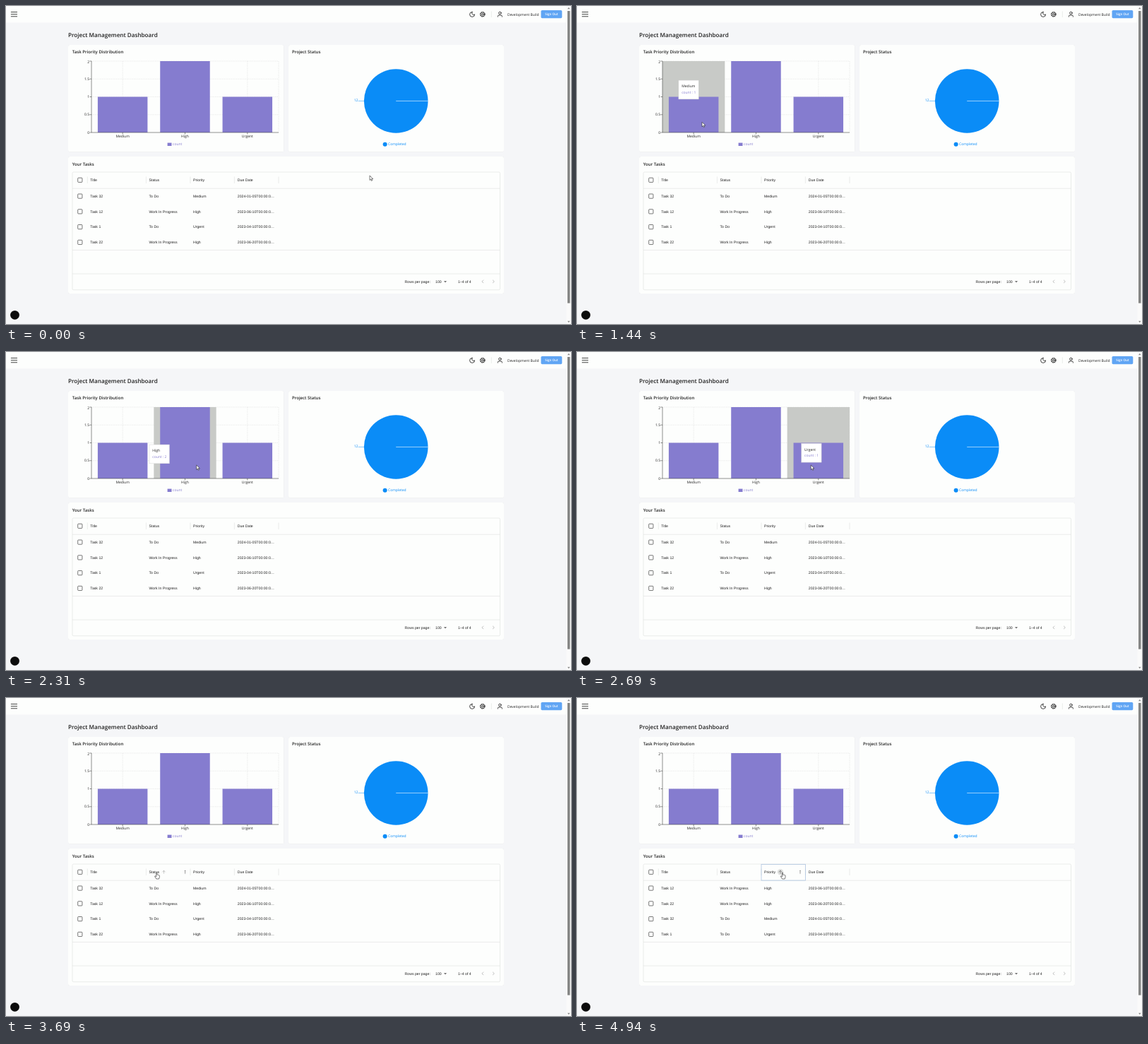
Animation of 800 by 450 pixels, one loop 5000 ms. Source, as an HTML page:

```html
<!DOCTYPE html>
<html lang="en">
<head>
<meta charset="utf-8">
<title>Dashboard</title>
<style>
  html, body { margin: 0; width: 100%; height: 100%; overflow: hidden; background: #f5f6f8; }
  svg { display: block; width: 100vw; height: 100vh; }
  text { font: 5px "Open Sans", sans-serif; fill: #222; text-rendering: geometricPrecision; white-space: pre; }
  .h1 { font-size: 8.15px; font-weight: 600; }
  .h2 { font-size: 6.05px; font-weight: 600; }
  .cell { font: 5.2px "Liberation Sans", Arial, sans-serif; }
  .mid { text-anchor: middle; }
  .end { text-anchor: end; }
  .count { fill: #857ccf; }
  .done { fill: #0a8cf7; }
  .card { fill: #fdfefd; filter: drop-shadow(0 .6px .7px rgba(0,0,0,.13)); }
  .line { fill: none; stroke: #dedfde; stroke-width: .6; }
  .grid { fill: none; stroke: #ccc; stroke-width: .42; stroke-dasharray: 1.25; }
  .axis { fill: none; stroke: #444; stroke-width: .6; }
  .box { fill: none; stroke: #555; stroke-width: .8; }
  .icon { fill: none; stroke: #222; stroke-width: .85; stroke-linecap: round; stroke-linejoin: round; }
</style>
</head>
<body>
<svg viewBox="0 0 800 450" preserveAspectRatio="none">
  <rect width="800" height="450" fill="#f5f6f8"/>
  <rect width="794" height="23.5" fill="#fdfefd"/>

  <path class="icon" stroke-width="1" d="M7.3 8.6H15.6M7.3 11.7H15.6M7.3 14.8H15.6"/>
  <path class="icon" d="M660.1 8.4a2.5 2.5 0 0 0 3.5 3.5a3.5 3.5 0 1 1-3.5-3.5z"/>
  <g class="icon">
    <circle cx="674.8" cy="11.8" r="1.3"/>
    <circle cx="674.8" cy="11.8" r="3"/>
    <circle cx="674.8" cy="11.8" r="3.5" stroke-dasharray="1.37" stroke-linecap="butt"/>
  </g>
  <path class="line" d="M687.3 7.5V16"/>
  <g class="icon"><circle cx="699.4" cy="9.9" r="1.7"/><path d="M696.4 15.2v-.7a1.5 1.5 0 0 1 1.5-1.5h3a1.5 1.5 0 0 1 1.5 1.5v.7"/></g>
  <text x="710" y="13.6" font-size="4.9">Development Build</text>
  <rect x="757.5" y="6" width="29.8" height="11.2" rx="1.6" fill="#60a5f4"/>
  <text class="mid" x="772.4" y="13.3" style="font-size:4.5px;font-weight:600;fill:#fff">Sign Out</text>

  <text class="h1" x="88" y="44.4">Project Management Dashboard</text>
  <rect class="card" x="88" y="55" width="305.5" height="151.5" rx="2.5"/>
  <rect class="card" x="400" y="55" width="305" height="151.5" rx="2.5"/>
  <rect class="card" x="88" y="213" width="617" height="194" rx="2.5"/>
  <text class="h2" x="93.8" y="67.2">Task Priority Distribution</text>
  <text class="h2" x="405" y="67.2">Project Status</text>
  <text class="h2" x="93.8" y="226.2">Your Tasks</text>

  <g id="chart"></g>

  <circle class="done" cx="552.2" cy="134.5" r="45.3"/>
  <path d="M552.2 134.4H597.5" stroke="#fff" stroke-width=".6"/>
  <path d="M498.7 134.4H507" stroke="#0a8cf7" stroke-width=".5"/>
  <text class="done end" x="498.4" y="134.5">12</text>
  <circle class="done" cx="536.6" cy="195.7" r="3"/>
  <text class="done" x="541" y="197.2">Completed</text>

  <rect class="line" x="94" y="235" width="605.5" height="166.7" rx="1.6"/>
  <path class="line" d="M94 258.2H699.5M94 345.4H699.5M94 379H699.5"/>
  <path class="line" d="M115.3 241.5V251M198.4 241.5V251M261 241.5V251M323.4 241.5V251M386 241.5V251"/>
  <g id="head"></g>
  <g id="rows"></g>

  <text class="cell" x="564.5" y="391.6">Rows per page:</text>
  <text class="cell" x="608" y="391.6">100</text>
  <path d="M620 389.2h4l-2 2z" fill="#555"/>
  <text class="cell" x="640" y="391.6">1–4 of 4</text>
  <path class="icon" style="stroke:#b5b6b5" d="M675.8 388l-1.9 1.9l1.9 1.9M689.4 388l1.9 1.9l-1.9 1.9"/>

  <circle cx="12.5" cy="437.3" r="6.4" fill="#0c0c0c"/>
  <rect x="793.5" width="6.5" height="450" fill="#fafafa"/>
  <rect x="795" y="7" width="3.6" height="413.5" fill="#858685"/>
  <path d="M795 4.2h3.6l-1.8-2.2zM795 445.8h3.6l-1.8 2.2z" fill="#858685"/>

  <g id="tip">
    <rect width="28.4" height="26.8" fill="#fff" stroke="#ccc" stroke-width=".4"/>
    <text id="tipName" x="4.3" y="10.3"></text>
    <text id="tipCount" class="count" x="4.3" y="18.8"></text>
  </g>
  <g id="cursor" stroke-width=".6" stroke-linejoin="round">
    <path id="arrow" fill="#fff" stroke="#222" d="M0 0v6.5l1.5-1.4l1 2.3l1.1-.5l-1-2.2h2.1z"/>
    <path id="hand" fill="#fff" stroke="#222" d="M-.6 .5q.6-.8 1.2 0v3q.7-.6 1.2.1q.7-.4 1.1.2q1-.2 1.1.8v2.2l-.8 2.4h-3.6l-2.3-3.4q0-1 .9-.6l1.2 1z"/>
  </g>
</svg>
<script>
const $ = id => document.getElementById(id);
const LOOP = 5000, STEP = 62.5;

const bars = [['Medium', 1], ['High', 2], ['Urgent', 1]];
const bandW = 88.33, bandX = i => 121 + i * bandW, bandMid = i => bandX(i) + bandW / 2;

const cols = [
  { name: 'Title', x: 119.3, left: 115.3, right: 198.4, icon: 135 },
  { name: 'Status', x: 202.5, left: 198.4, right: 261, icon: 223.5 },
  { name: 'Priority', x: 265, left: 261, right: 323.4, icon: 288 },
  { name: 'Due Date', x: 327.8, left: 323.4, right: 386, icon: 356 }
];
const tasks = [
  ['Task 32', 'To Do', 'Medium', '2024-01-05'],
  ['Task 12', 'Work In Progress', 'High', '2023-06-10'],
  ['Task 1', 'To Do', 'Urgent', '2023-04-10'],
  ['Task 22', 'Work In Progress', 'High', '2023-06-20']
];

// time, x, y of the pointer tip
const path = [
  [0, 515, 240], [690, 515, 240], [812, 438.5, 259.5], [940, 340, 252], [1060, 270, 243],
  [1187, 228, 239], [1250, 203, 205], [1312, 184, 172], [1437, 177, 164.3], [2125, 180, 163],
  [2234, 212, 161], [2312, 269.7, 160], [2440, 272, 160], [2526, 299, 160], [2688, 331.3, 160],
  [2940, 335, 160], [3060, 310, 182], [3250, 235, 232], [3440, 190, 257], [3500, 190, 257],
  [3687, 213.3, 246.8], [4250, 213.3, 246.8], [4500, 291, 246.8], [5000, 291, 246.8]
];
// start of each chart hover, with the tooltip's starting corner
const hovers = [
  { t: 1282, x: 94, y: 49 },
  { t: 2234, x: 169.3, y: 132 },
  { t: 2526, x: 257.7, y: 129 }
];
const hoverEnd = 3050;
const sorts = [{ t: 4060, col: 1 }, { t: 4690, col: 2 }];

const text = (s, x, y, cls = '') => `<text class="${cls}" x="${x}" y="${y}">${s}</text>`;
const checkbox = y => `<rect class="box" x="101.7" y="${y - 3}" width="6.2" height="6.2" rx=".8"/>`;

function buildChart() {
  let s = '<rect id="band" y="78" height="101" fill="#c8cac7"/>', ticks = 'M121 78V179H386';
  for (let i = 0; i < 5; i++) {
    const y = 179 - i * 25.25;
    ticks += `M118.5 ${y}H121`;
    if (i) s += `<path class="grid" d="M121 ${y}H386"/>`;
    s += text(i / 2, 118, y + (i === 4 ? 3 : 1.7), 'end');
  }
  bars.forEach(([name, n], i) => {
    const mid = bandMid(i), h = n * 50.5;
    s += `<path class="grid" d="M${mid} 78V179"/>` + text(name, mid, 185.8, 'mid');
    s += `<rect class="count" x="${bandX(i) + 8.9}" y="${179 - h}" width="70.5" height="${h}"/>`;
    ticks += `M${mid} 179v2.5`;
  });
  s += `<path class="grid" d="M386 78V179"/><path class="axis" d="${ticks}"/>`;
  s += '<rect class="count" x="228.6" y="193.6" width="5.9" height="4.4"/>' + text('count', 236, 197.2, 'count');
  // the hover band lies over the grid but under the bars
  $('chart').innerHTML = s;
  const band = $('band');
  $('chart').querySelectorAll('.grid').forEach(g => $('chart').prepend(g));
  $('chart').insertBefore(band, $('chart').querySelector('rect.count'));
}

function pointerAt(t) {
  const i = Math.max(1, path.findIndex(p => p[0] > t));
  const [t0, x0, y0] = path[i - 1], [t1, x1, y1] = path[i];
  const k = (t - t0) / (t1 - t0);
  return [x0 + (x1 - x0) * k, y0 + (y1 - y0) * k];
}

function drawTip(t, py) {
  const i = t < hoverEnd ? hovers.filter(h => h.t <= t).length - 1 : -1;
  const shown = i < 0 ? 'none' : '';
  $('tip').style.display = $('band').style.display = shown;
  if (i < 0) return;
  const h = hovers[i], [name, n] = bars[i];
  const k = 1 - (1 - Math.min(1, (t - h.t) / 400)) ** 2.2;
  const x = h.x + (bandMid(i) + 4.2 - h.x) * k, y = h.y + (py - 30.5 - h.y) * k;
  $('band').setAttribute('x', bandX(i));
  $('band').setAttribute('width', bandW);
  $('tip').setAttribute('transform', `translate(${x} ${y})`);
  $('tipName').textContent = name;
  $('tipCount').textContent = 'count : ' + n;
}

function drawHead(px, py, sorted) {
  const over = py > 235 && py < 258 ? cols.findIndex(c => px > c.left && px < c.right) : -1;
  let s = checkbox(246.2);
  cols.forEach((c, i) => {
    const hot = i === over, active = i === sorted;
    s += text(c.name, c.x, 248, 'cell');
    if (active) s += `<rect x="${c.left}" y="235.3" width="${c.right - c.left}" height="22.8" fill="none" stroke="#a3bcdc" stroke-width=".7"/>`;
    if (hot && Math.abs(px - c.icon) < 5) s += `<circle cx="${c.icon}" cy="246.2" r="4.2" fill="#e0e1e0"/>`;
    if (hot || active) s += `<path class="icon" style="stroke:${active ? '#666' : '#b0b1b0'};stroke-width:.7" d="M${c.icon} 248.2v-4m-1.9 1.9l1.9-1.9l1.9 1.9"/>`;
    if (hot) for (const y of [244.4, 246.2, 248]) s += `<circle cx="${c.right - 7.4}" cy="${y}" r=".6" fill="#555"/>`;
  });
  $('head').innerHTML = s;
  return over >= 0;
}

function drawRows(sorted) {
  const list = [...tasks];
  if (sorted >= 0) list.sort((a, b) => a[sorted] < b[sorted] ? -1 : a[sorted] > b[sorted] ? 1 : 0);
  $('rows').innerHTML = list.map((row, r) => {
    const y = 269 + r * 21.75;
    return checkbox(y) + row.map((v, i) => text(i === 3 ? v + 'T00:00:0…' : v, cols[i].x, y + 1.8, 'cell')).join('');
  }).join('');
}

let lastSort;
function render(t) {
  const [x, y] = pointerAt(t);
  const done = sorts.filter(s => s.t <= t), sorted = done.length ? done[done.length - 1].col : -1;
  const onHead = drawHead(x, y, sorted);
  if (sorted !== lastSort) drawRows(lastSort = sorted);
  drawTip(t, y);
  $('cursor').setAttribute('transform', `translate(${x} ${y})`);
  $('hand').style.display = onHead ? '' : 'none';
  $('arrow').style.display = onHead ? 'none' : '';
}

buildChart();
const start = performance.now();
function tick() {
  const t = (performance.now() - start) % LOOP;
  render(Math.floor((t + 3) / STEP) * STEP % LOOP);
  requestAnimationFrame(tick);
}
tick();
</script>
</body>
</html>
```
